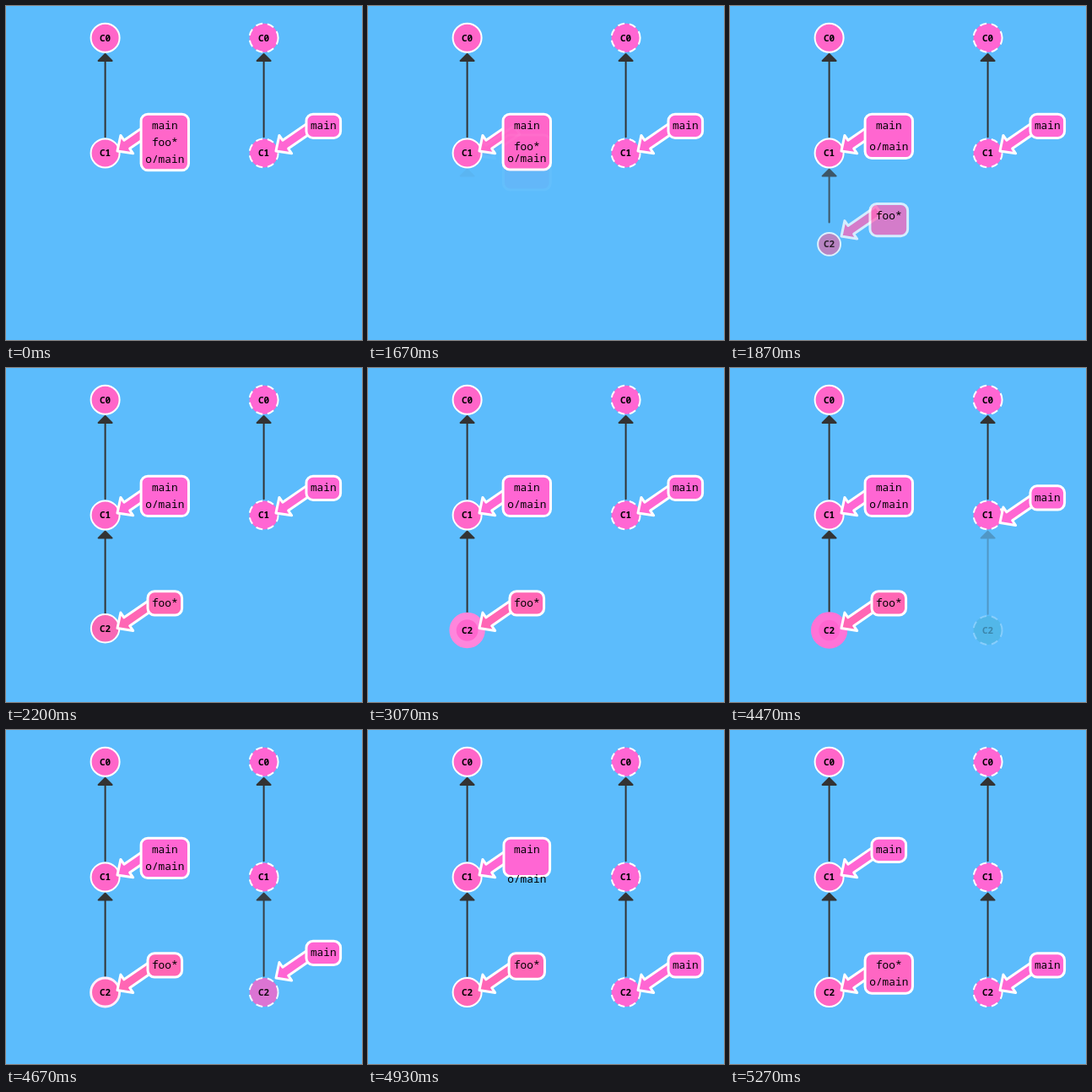
These frames come from a looping animation (422x396 px, 6990 ms). An HTML page:

```html
<!DOCTYPE html>
<html lang="en">
<head>
<meta charset="utf-8">
<title>Commit tree</title>
<style>
  html, body { margin: 0; width: 100%; height: 100%; overflow: hidden; background: #5cbcfc; }
  svg { display: block; width: 422px; height: 396px; }
  text { font-family: "Noto Sans Mono", "DejaVu Sans Mono", monospace; text-anchor: middle; fill: #000; }
  .node text { font-size: 11px; font-weight: 600; }
  .label text { font-size: 12.8px; }
  .edge { fill: #333; stroke: #333; stroke-width: 2; stroke-linejoin: round; stroke-linecap: round; }
  .flag { stroke: #fff; stroke-width: 3; stroke-linejoin: round; }
</style>
</head>
<body>
<svg id="stage" viewBox="0 0 422 396"></svg>
<script>
const LOOP = 6990, STEP = 200 / 3;
const LOCAL = 117.6, REMOTE = 305.6;
const ROW = [37.8, 174.4, 311];
const RADIUS = 17, EDGE_GAP = 19.2, HEAD = 8, LINE = 19.7;

const WHITE = [255, 255, 255], TEAL = [36, 179, 179];
const pink = blue => [255, 102, blue];
const MAIN = pink(211), FOO = pink(180), ALL = pink(201), PAIR = pink(195);

const stage = document.getElementById('stage');

function set(node, attrs) {
  for (const key in attrs) node.setAttribute(key, attrs[key]);
}

function add(name, attrs = {}, parent = stage) {
  const node = document.createElementNS('http://www.w3.org/2000/svg', name);
  set(node, attrs);
  parent.appendChild(node);
  return node;
}

const rgb = c => `rgb(${c.map(Math.round)})`;
const mix = (a, b, p) => Array.isArray(a) ? a.map((v, i) => mix(v, b[i], p)) : a + (b - a) * p;
// Folds [progress, value] stages onto a starting value.
const follow = (start, ...stages) => stages.reduce((v, [p, to]) => mix(v, to, p), start);

function easeInOut(n) {
  if (n <= 0 || n >= 1) return n <= 0 ? 0 : 1;
  const q = 0.48 - n / 1.04, r = Math.sqrt(0.1734 + q * q);
  const s = Math.cbrt(r - q) + Math.cbrt(-r - q) + 0.5;
  return 3 * (1 - s) * s * s + s ** 3;
}

function bounce(n) {
  if (n <= 0 || n >= 1) return n <= 0 ? 0 : 1;
  const k = n * 2.75;
  if (k < 1) return k * k;
  if (k < 2) return (k - 1.5) ** 2 + 0.75;
  if (k < 2.5) return (k - 2.25) ** 2 + 0.9375;
  return (k - 2.625) ** 2 + 0.984375;
}

function makeEdge(x, row) {
  const path = add('path', { class: 'edge' });
  return (tailY = ROW[row + 1], opacity = 1) => {
    const tip = ROW[row] + EDGE_GAP, base = tip + HEAD;
    set(path, {
      d: `M${x} ${tailY - EDGE_GAP}V${base}H${x - HEAD}L${x} ${tip}L${x + HEAD} ${base}H${x}`,
      opacity
    });
  };
}

function makeNode(x, name, dashed) {
  const group = add('g', { class: 'node' });
  const circle = add('circle', { cx: x }, group);
  if (dashed) set(circle, { 'stroke-dasharray': '8 6' });
  const text = add('text', { x }, group);
  text.textContent = name;
  return ({ y, fill, r = RADIUS, stroke = WHITE, width = 2, opacity = 1 }) => {
    set(circle, { cy: y, r, fill: rgb(fill), stroke: rgb(stroke), 'stroke-width': width, opacity });
    set(text, { y: y + 4, opacity });
  };
}

// Arrow outline from its tip, pointing along the x axis before rotation.
const ARROW = 'M0 0L13.7 -13V-6H54V6H13.7V13Z';

function makeLabel(x, name) {
  const group = add('g', { class: 'label' });
  const arrow = add('path', { class: 'flag', d: ARROW }, group);
  const rect = add('rect', { class: 'flag', rx: 8 }, group);
  const text = add('text', { x: x + 70.7 }, group);
  text.textContent = name;
  // y: node height, slot: line in the stack, lines: stack size
  return ({ y, slot = 0, lines = 1, wide = 0, fill = MAIN, opacity = 1 }) => {
    const textY = y - 32.4 + slot * LINE;
    const w = mix(40.6, 56.4, wide);
    set(arrow, {
      transform: `translate(${x + 14.4} ${y - 2.5}) rotate(-34.5)`,
      fill: rgb(fill), opacity
    });
    set(rect, {
      x: x + 70.7 - w / 2, y: textY - 13.8, width: w, height: 9 + 19.2 * lines,
      fill: rgb(fill), opacity
    });
    set(text, { y: textY + 4.3 });
  };
}

const edges = {
  local: makeEdge(LOCAL, 0), localNew: makeEdge(LOCAL, 1),
  remote: makeEdge(REMOTE, 0), remoteNew: makeEdge(REMOTE, 1)
};
const localNodes = ['C2', 'C1', 'C0'].map(name => makeNode(LOCAL, name, false));
const remoteNodes = ['C2', 'C1', 'C0'].map(name => makeNode(REMOTE, name, true));
const labels = {
  main: makeLabel(LOCAL, 'main'),
  foo: makeLabel(LOCAL, 'foo*'),
  origin: makeLabel(LOCAL, 'o/main'),
  remote: makeLabel(REMOTE, 'main')
};

edges.local();
edges.remote();
for (const i of [1, 2]) {
  localNodes[i]({ y: ROW[2 - i], fill: ALL });
  remoteNodes[i]({ y: ROW[2 - i], fill: MAIN });
}

function draw(t) {
  const phase = (start, length, ease = easeInOut) => ease((t - start) / length);
  const commit = phase(1608, 400), commitDrop = phase(1608, 800, bounce);
  const highlight = phase(2670, 580);
  const push = phase(3514, 400), pushDrop = phase(3514, 800, bounce);
  const sync = phase(4395, 352);
  const track = phase(4840, 400);
  const [, mid, low] = ROW;

  edges.localNew(mix(mid, low, commit), commit);
  localNodes[0]({
    y: mix(mid, low, commitDrop),
    r: RADIUS * commitDrop,
    opacity: commitDrop,
    fill: follow(TEAL, [commitDrop, FOO], [highlight, MAIN], [sync, FOO], [track, PAIR]),
    stroke: follow(WHITE, [highlight, MAIN], [sync, WHITE]),
    width: follow(2, [highlight, 10], [sync, 2])
  });

  edges.remoteNew(mix(mid, low, push), follow(0, [push, 0.2], [sync, 1]));
  remoteNodes[0]({
    y: mix(mid, low, pushDrop),
    r: RADIUS * pushDrop,
    opacity: follow(0, [pushDrop, 0.2], [sync, 1]),
    fill: mix(TEAL, MAIN, sync)
  });

  labels.main({
    y: mid,
    lines: follow(3, [commit, 2], [track, 1]),
    wide: 1 - track,
    fill: mix(ALL, MAIN, commit)
  });
  labels.foo({
    y: mix(mid, low, commit),
    slot: 1 - commit,
    lines: follow(3, [commit, 1], [track, 2]),
    wide: follow(1, [commit, 0], [track, 1]),
    fill: follow(ALL, [commit, FOO], [track, PAIR]),
    opacity: commit
  });
  labels.origin({ y: mix(mid, low, track), slot: mix(2, 1, commit), opacity: 0 });
  labels.remote({ y: mix(mid, low, sync) });
}

// The picture advances fifteen times a second.
const begin = performance.now();
function tick() {
  const t = (performance.now() - begin) % LOOP;
  draw(Math.floor((t + 4) / STEP) * STEP);
  requestAnimationFrame(tick);
}
tick();
</script>
</body>
</html>
```
